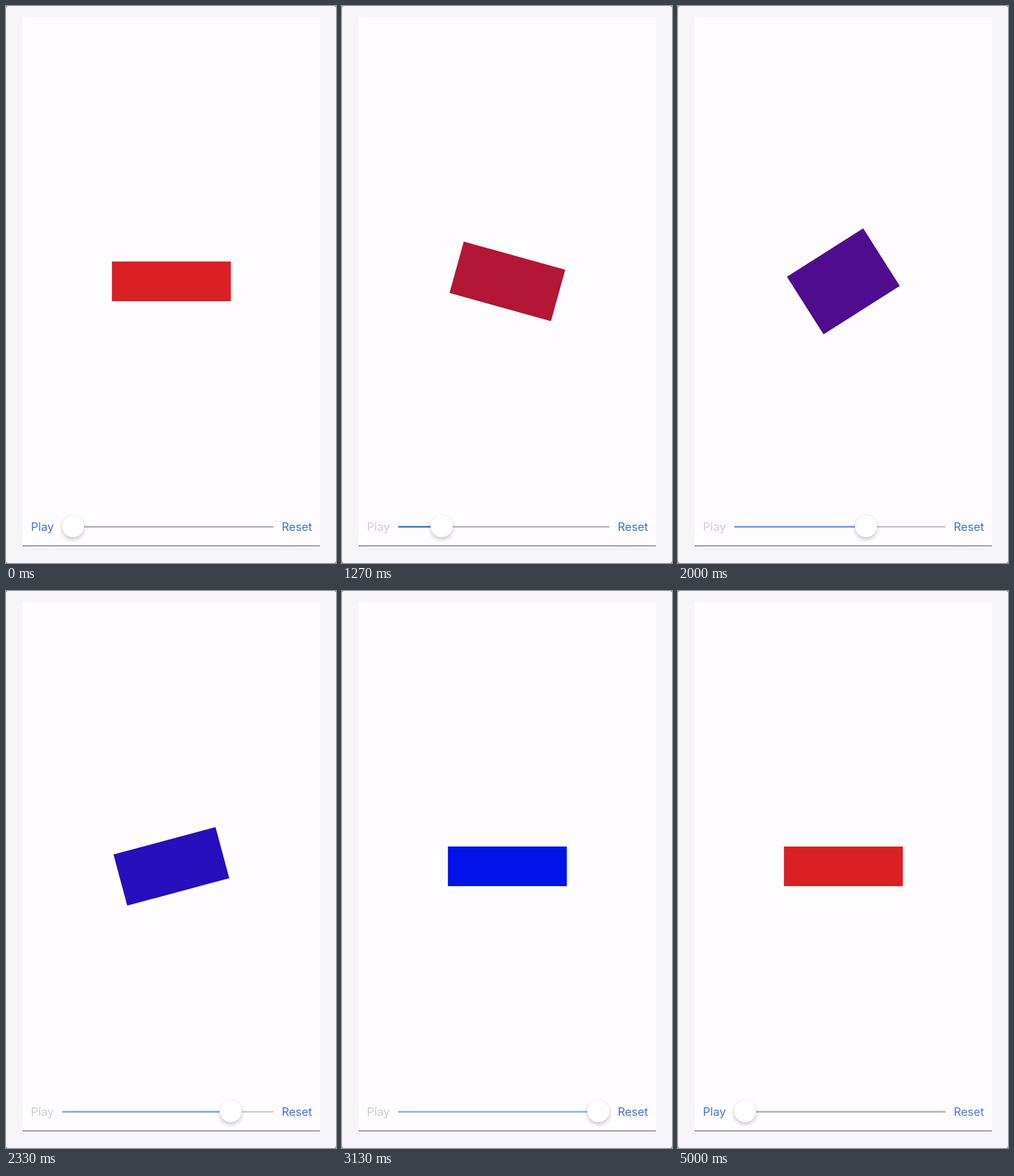
An HTML page that plays this animation: 576x972 px, repeating every 5.07 s.

```html
<!DOCTYPE html>
<html lang="en">
<head>
<meta charset="utf-8">
<title>Slider-driven animation</title>
<style>
  html, body { margin: 0; width: 100%; height: 100%; overflow: hidden; background: #777; }
  svg { display: block; width: 576px; height: 972px; }
  text { font: 20px Inter, Roboto, sans-serif; }
  #knob { filter: drop-shadow(0 4px 3.5px rgba(0, 0, 0, .2)); }
</style>
</head>
<body>
<svg viewBox="0 0 576 972">
  <rect width="576" height="972" rx="4" fill="#f6f5f9"/>
  <rect x="29" y="19.5" width="519" height="922" fill="#fffdff"/>
  <rect x="29" y="941.4" width="519" height="1.6" fill="#7c7c7e"/>
  <rect id="box"/>
  <text id="play" x="43.6" y="915.5">Play</text>
  <text id="reset" x="534.2" y="915.5" text-anchor="end" fill="#4175c8">Reset</text>
  <rect id="track" x="98" y="907.5" width="369" height="2.7" rx="1.3"/>
  <rect id="done" x="98" y="907.5" height="2.7" rx="1.3"/>
  <circle id="knob" cy="907.7" r="19.5" fill="#fff" stroke="#000" stroke-opacity=".08" stroke-width=".8"/>
</svg>
<script>
const LOOP = 5070, STEP = 200 / 3;
const PLAY_AT = 595, RESET_AT = 4595, RUN_START = 550, RUN_TIME = 2490;
const $ = id => document.getElementById(id);
const [box, play, reset, track, done, knob] =
  ['box', 'play', 'reset', 'track', 'done', 'knob'].map($);

const clamp = (x, lo, hi) => Math.min(hi, Math.max(lo, x));
const mix = (a, b, k) => a + (b - a) * k;
const blend = (a, b, k) => `rgb(${a.map((v, i) => Math.round(mix(v, b[i], k)))})`;

// A tapped label dims at once, then fades back.
const tapFade = (t, at) => t < at ? 1 : clamp((t - at) / 430, .2, 1);

// cubic-bezier(.42, 0, .58, 1), solved by bisection
function easeInOut(x) {
  let lo = 0, hi = 1, s;
  for (let i = 0; i < 24; i++) {
    s = (lo + hi) / 2;
    const bx = 3 * s * (1 - s) * (.42 * (1 - s) + .58 * s) + s ** 3;
    if (bx < x) lo = s; else hi = s;
  }
  return s * s * (3 - 2 * s);
}

// Red to blue, passing through darker tones.
function boxColor(p) {
  const green = 32 * (1 - p) ** 2 + 19 * p * p;
  return `rgb(${[mix(217, 2, p), green, mix(36, 234, p ** 1.4)].map(Math.round)})`;
}

function set(el, attrs) {
  for (const name in attrs) el.setAttribute(name, attrs[name]);
}

function draw(time) {
  // The picture advances 15 times a second.
  const t = Math.floor((time % LOOP + 4) / STEP) * STEP;
  const active = t >= PLAY_AT && t < RESET_AT;
  const p = active ? easeInOut(clamp((t - RUN_START) / RUN_TIME, 0, 1)) : 0;
  const w = mix(207.6, 69.2, p), h = mix(69.2, 207.6, p);
  const x = mix(117, 447.5, p);

  set(box, {
    x: -w / 2, y: -h / 2, width: w, height: h, fill: boxColor(p),
    transform: `translate(288.65 480.5) rotate(${90 * p})`
  });
  set(knob, { cx: x });
  set(done, { width: x - 98, fill: blend([56, 106, 200], [136, 180, 231], p) });
  set(track, { fill: blend([174, 173, 178], [205, 204, 208], p) });
  set(play, {
    fill: active ? '#cdcdd1' : '#4479c8',
    opacity: active ? tapFade(t, PLAY_AT) : 1
  });
  set(reset, { opacity: tapFade(t, RESET_AT) });
}

const start = performance.now();
function tick() {
  draw(performance.now() - start);
  requestAnimationFrame(tick);
}
tick();
</script>
</body>
</html>
```
